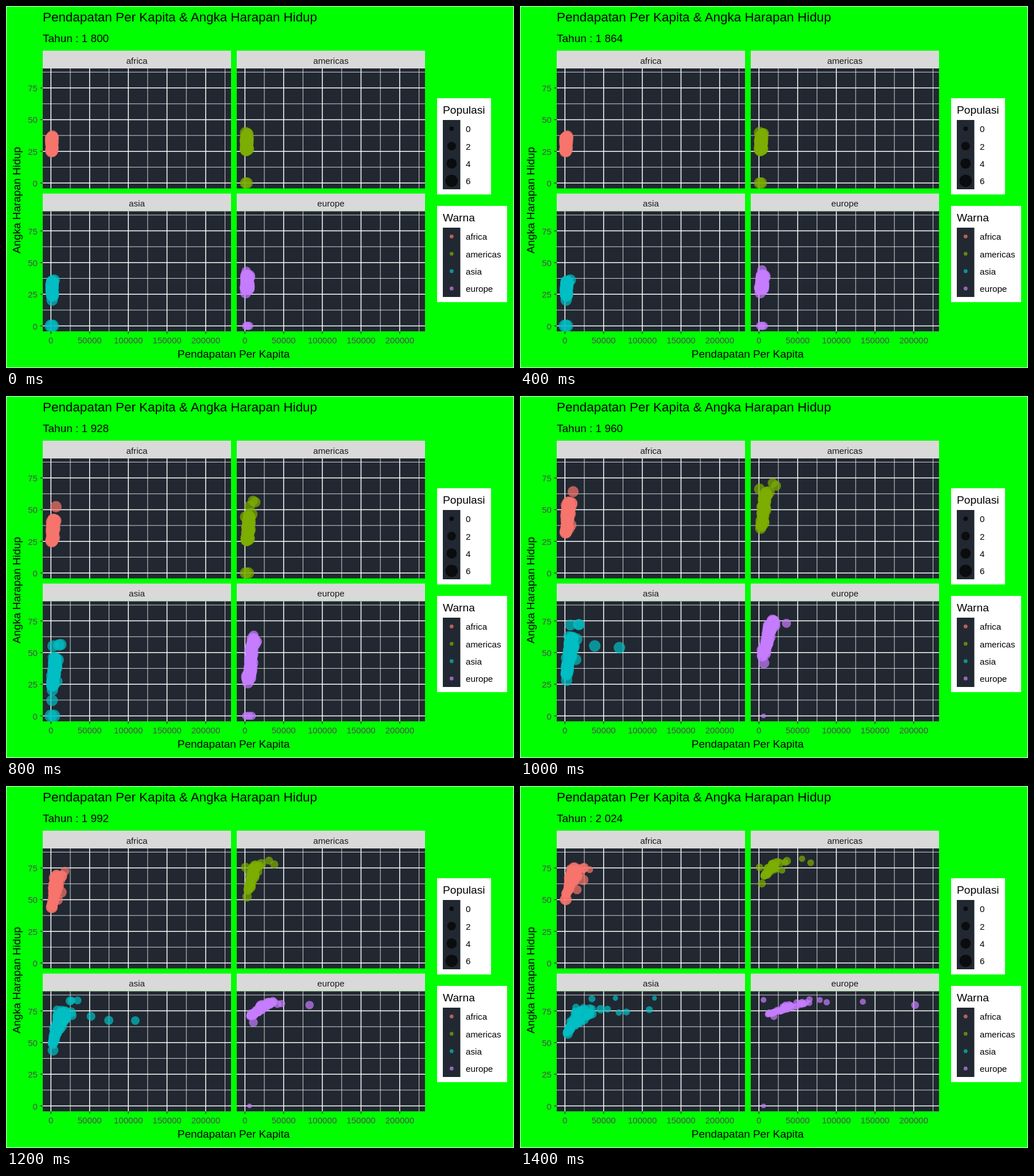
Write an HTML page that moves like this. It is 885 px wide and 632 px high and loops after 1.5 s.

```html
<!DOCTYPE html>
<html lang="id">
<head>
<meta charset="utf-8">
<title>Pendapatan Per Kapita &amp; Angka Harapan Hidup</title>
<style>
  html, body { margin: 0; width: 100%; height: 100%; overflow: hidden; background: #0f0; }
  svg { display: block; width: 885px; height: 632px; font-family: "Liberation Sans", Arial, sans-serif; }
</style>
</head>
<body>
<svg id="stage" viewBox="0 0 885 632"></svg>
<script>
const stage = document.getElementById('stage');
const STEP_MS = 100, STEPS = 15, LAST = STEPS - 1;
const DARK = '#222831';
const UNIT_X = 67.4, UNIT_Y = 55.3;

function add(parent, tag, attrs) {
  const el = document.createElementNS('http://www.w3.org/2000/svg', tag);
  for (const key in attrs) el.setAttribute(key, attrs[key]);
  parent.appendChild(el);
  return el;
}
const rect = (x, y, width, height, fill, parent = stage) =>
  add(parent, 'rect', { x, y, width, height, fill });
const line = (x1, y1, x2, y2, stroke, width) =>
  add(stage, 'line', { x1, y1, x2, y2, stroke, 'stroke-width': width });
const circle = (parent, fill, cx = 0, cy = 0, r = 0) =>
  add(parent, 'circle', { cx, cy, r, fill, 'fill-opacity': 0.7 });
function text(str, x, y, size, fill = '#000', anchor = 'start', more = {}) {
  const el = add(stage, 'text', { x, y, 'font-size': size, fill, 'text-anchor': anchor, ...more });
  el.textContent = str;
  return el;
}

// Background and titles
add(stage, 'rect', { width: 885, height: 632, fill: '#0f0', stroke: '#fff', 'stroke-width': 1.8 });
text('Pendapatan Per Kapita & Angka Harapan Hidup', 64, 27, 22.4);
const year = text('', 64, 63, 19);
text('Pendapatan Per Kapita', 396.5, 614, 18.9, '#000', 'middle');
text('Angka Harapan Hidup', 0, 0, 18.9, '#000', 'middle', { transform: 'translate(25 339) rotate(-90)' });

// Facet panels
const clip = add(add(stage, 'defs', {}), 'clipPath', { id: 'panels' });

function panel(name, color, left, top) {
  const right = left + 328, bottom = top + 209.5, x0 = left + 14.3, y0 = top + 200;
  rect(left, top - 31, 328, 31, '#D9D9D9');
  rect(left, top, 328, 209.5, DARK);
  rect(left, top, 328, 209.5, '#000', clip);
  text(name, left + 164, top - 8.2, 15.2, '#1A1A1A', 'middle');
  for (const [offset, width] of [[0.5, 0.8], [0, 1.5]]) {
    for (let i = 0; i < 4; i++) {
      const y = y0 - (i + offset) * UNIT_Y;
      line(left, y, right, y, '#fff', width);
    }
    for (let i = 0; i < 5; i++) {
      const x = x0 + (i + offset) * UNIT_X;
      line(x, top, x, bottom, '#fff', width);
    }
  }
  if (left < 100) for (let i = 0; i < 4; i++) {
    const y = y0 - i * UNIT_Y;
    line(left - 4.6, y, left, y, '#333', 1.5);
    text(i * 25, left - 9, y + 6, 15.1, '#4D4D4D', 'end');
  }
  if (top > 300) for (let i = 0; i < 5; i++) {
    const x = x0 + i * UNIT_X;
    line(x, bottom, x, bottom + 4.6, '#333', 1.5);
    text(i * 50000, x, bottom + 20.5, 15.1, '#4D4D4D', 'middle');
  }
  return { name, color, x0, y0 };
}
const africa = panel('africa', '#F8766D', 64, 109);
const americas = panel('americas', '#7CAE00', 402, 109);
const asia = panel('asia', '#00BFC4', 64, 358.5);
const europe = panel('europe', '#C77CFF', 402, 358.5);

// Legends
function legend(title, top, width, items) {
  rect(751, top, width, 168, '#fff');
  rect(761, top + 38, 30.5, 121, DARK);
  text(title, 761, top + 26.5, 19.2);
  items.forEach(([label, color, r], i) => {
    const y = top + 53.3 + i * 30.3;
    circle(stage, color, 776.3, y, r);
    text(label, 801, y + 6, 15.2);
  });
}
legend('Populasi', 161, 94, [4, 7.5, 9, 10.8].map((r, i) => [i * 2, '#000', r]));
legend('Warna', 349, 122, [africa, americas, asia, europe].map(p => [p.name, p.color, 3.4]));

// Countries: income doubles at a steady pace, life expectancy rises along an S-curve.
let seed = 7;
function rand() {
  seed = (seed * 16807) % 2147483647;
  return seed / 2147483647;
}
const mix = (a, b, f) => a + (b - a) * f;
const growth = k => 2 ** ((k - LAST) / 2.3);
function rise(k, from, to) {
  const f = Math.min(1, Math.max(0, (k - from) / (to - from)));
  return f * f * (3 - 2 * f);
}

const layer = add(stage, 'g', { 'clip-path': 'url(#panels)' });
const dots = [];

// life and income are in pixels from the panel's zero point; span is when life rises.
function country({ x0, y0, color }, { dx = 1, income = 0, boom = 1, life, span = [4, 13],
                                      size = [10, 6], begin = 0, end = LAST }) {
  dots.push({
    el: circle(layer, color),
    place: k => k < begin || k > end ? [0, 0, 0] : [
      x0 + dx + income * growth(k) ** boom,
      y0 - mix(...life, rise(k, ...span)),
      mix(...size, rise(k, 9, 14.5))
    ]
  });
}

// Low and high hold [life before, life after, rise from, rise to] for the ends of the cloud.
function cloud(place, count, { low, high, base, floor, reach, skew, size }) {
  for (let i = 0; i < count; i++) {
    const u = i / (count - 1), wealth = 0.25 + 0.75 * rand() ** skew, scale = 0.9 + rand() * 0.2;
    const [before, after, from, to] = low.map((v, j) => mix(v, high[j], u));
    country(place, {
      dx: 0.5 + base * rand(), income: floor + reach * u * wealth,
      life: [before, after], span: [from, to], size: [10.3 * scale, size * scale]
    });
  }
}

// Missing values sit on the zero line until the middle of the last century.
function missing(place, count, dx, r) {
  for (let i = 0; i < count; i++)
    country(place, { dx: dx + i * 2.5, income: i * 15, life: [0, 0], size: [r, r], end: 9 });
}

cloud(africa, 52, { low: [56, 122, 8, 14.5], high: [80, 168, 6, 14],
  base: 2, floor: 1, reach: 34, skew: 1.5, size: 8 });
country(africa, { dx: 2, income: 41, life: [82, 163] });
country(africa, { income: 31, life: [62, 145], span: [8, 14], size: [10, 9] });
country(africa, { income: 20, life: [60, 128], span: [8, 14], size: [10, 8] });
for (let i = 0; i < 2; i++)
  country(africa, { dx: 1 + i, life: [57 + i, 111], span: [8, 14], size: [10, 10] });
country(africa, { life: [12, 12], begin: 6, end: 6 });

cloud(americas, 34, { low: [57, 152, 8, 14], high: [84, 178, 6, 13],
  base: 4, floor: 7, reach: 40, skew: 0.8, size: 6.7 });
country(americas, { dx: 4, income: 86, life: [87, 175], size: [9, 5.8] });
country(americas, { dx: 2, income: 73, life: [86, 182], size: [9, 5.5] });
country(americas, { dx: 2, income: 38, life: [84, 162], size: [9.5, 6] });
country(americas, { life: [88, 167], span: [7, 11.5], size: [10, 6.5] });
country(americas, { dx: 2, income: 3, life: [58, 139], span: [8, 14.2], size: [10, 7] });
missing(americas, 2, 1, 10);

cloud(asia, 54, { low: [53, 128, 8, 14], high: [78, 172, 5.5, 13],
  base: 2.5, floor: 1, reach: 68, skew: 2.2, size: 7 });
country(asia, { dx: 2, income: 45, boom: 0.6, life: [80, 187] });
country(asia, { dx: 2, income: 86, boom: 1.1, life: [78, 188], size: [10, 4.5] });
country(asia, { dx: 2, income: 154, boom: 2.5, life: [75, 188], size: [10, 4] });
country(asia, { income: 106, boom: 0.1, life: [90, 164], span: [7, 14], begin: 10, size: [10.5, 6] });
country(asia, { income: 146, boom: 0, life: [130, 168], span: [10, 14], begin: 11, size: [9.5, 6] });
country(asia, { income: 93, boom: 0.5, life: [100, 163], span: [8, 13], begin: 10, size: [10.5, 5.5] });
country(asia, { dx: 2, income: 72, boom: 1.2, life: [60, 169], span: [8, 13] });
country(asia, { dx: 2, income: 3, life: [45, 131], span: [8, 15], size: [10, 9] });
country(asia, { dx: 2, life: [27, 27], begin: 8, end: 8 });
missing(asia, 2, 0, 11);

cloud(europe, 46, { low: [64, 160, 8, 12.5], high: [88, 181, 4, 12],
  base: 6, floor: 14, reach: 78, skew: 0.6, size: 5.6 });
country(europe, { income: 87, life: [95, 186], span: [3, 13], size: [8.5, 5.5] });
country(europe, { dx: 5, income: 113, boom: 1.3, life: [88, 181], size: [9, 5.4] });
country(europe, { dx: 4, income: 102, boom: 1.3, life: [86, 185], size: [9, 5.2] });
country(europe, { dx: 4, income: 268, boom: 1.5, life: [84, 176], span: [4, 12], size: [8, 6.8] });
country(europe, { dx: 4, income: 177, boom: 1.8, life: [84, 182], size: [8, 5.2] });
country(europe, { income: 25, life: [58, 156], span: [8, 13] });
country(europe, { dx: 8, life: [185, 185], begin: 13, size: [5, 5] });
country(europe, { dx: 8, life: [0, 0], begin: 10, size: [4, 4] });
missing(europe, 3, 2, 7.2);

let shown = -1;
function draw() {
  const k = Math.floor(performance.now() / STEP_MS) % STEPS;
  if (k !== shown) {
    shown = k;
    const y = 1800 + k * 16;
    year.textContent = `Tahun : ${Math.floor(y / 1000)} ${String(y % 1000).padStart(3, '0')}`;
    for (const { el, place } of dots) {
      const [cx, cy, r] = place(k);
      el.setAttribute('cx', cx);
      el.setAttribute('cy', cy);
      el.setAttribute('r', r);
    }
  }
  requestAnimationFrame(draw);
}
draw();
</script>
</body>
</html>
```
